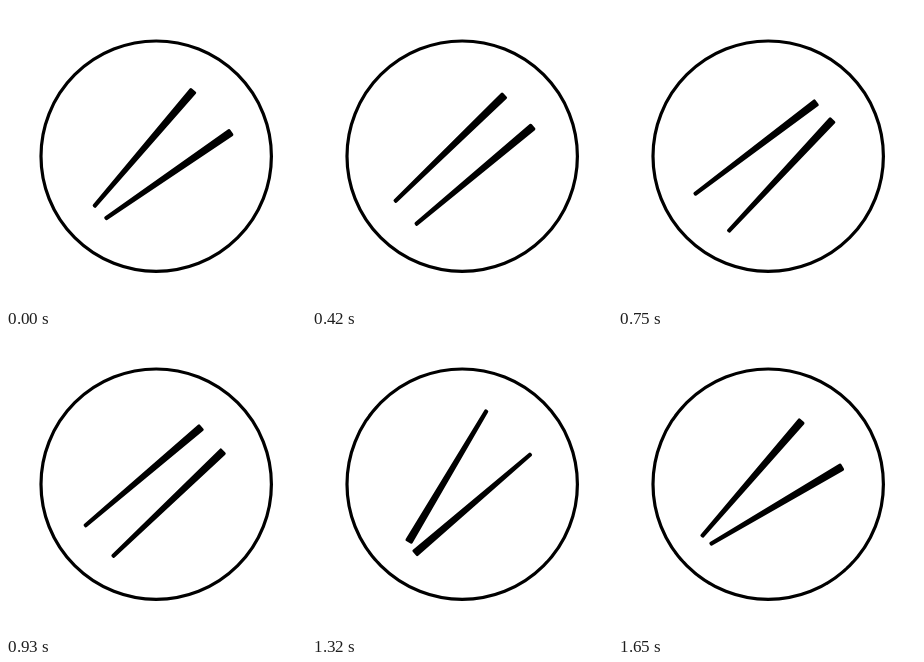
Recreate the animation shown at these times as an HTML page. Size 300 by 300 pixels, loop 1.68 s.

```html
<!DOCTYPE html>
<html lang="en">
<head>
<meta charset="utf-8">
<title>Chopsticks</title>
<style>
  html, body { margin: 0; width: 100%; height: 100%; overflow: hidden; background: #fff; }
  svg { display: block; width: 100%; height: 100%; }
</style>
</head>
<body>
<svg viewBox="0 0 300 300">
  <defs>
    <path id="stick" d="M-77 -.6L74 -2.5V2.5L-77 .6Z" stroke="#000" stroke-width="3" stroke-linejoin="round"/>
  </defs>
  <circle cx="150.2" cy="150.2" r="115.2" fill="none" stroke="#000" stroke-width="3.2"/>
  <use id="upper" href="#stick"/>
  <use id="lower" href="#stick"/>
</svg>
<script>
const LOOP = 1680, STEP = 30;
const MEAN_ANGLE = 42;
const SPIN = { start: 1080, end: 1500, degrees: 362.2 };
// Angle between the sticks: open, closed, open, closed, open.
const OPENING = [[0, 14.9], [270, -15], [545, 18.7], [820, -15], [1095, 18.7]];

const upper = document.getElementById('upper');
const lower = document.getElementById('lower');

const progress = (t, start, end) => Math.min(1, Math.max(0, (t - start) / (end - start)));
const easeSine = x => (1 - Math.cos(Math.PI * x)) / 2;

function openingAt(t) {
  let value = OPENING[0][1];
  for (let i = 1; i < OPENING.length; i++) {
    const [start, from] = OPENING[i - 1], [end, to] = OPENING[i];
    value += (to - from) * easeSine(progress(t, start, end));
  }
  return value;
}

function place(stick, x, y, angle) {
  stick.setAttribute('transform', `translate(${x} ${y}) rotate(${-angle})`);
}

function draw(t) {
  const spin = SPIN.degrees * progress(t, SPIN.start, SPIN.end) ** 1.33;
  const drift = easeSine(progress(t, 780, 1420));
  const dx = -4 * drift, dy = 2.1 * drift;
  const angle = MEAN_ANGLE - spin, half = openingAt(t) / 2;
  place(upper, 138.7 + dx, 141.4 + dy, angle + half);
  place(lower, 163.5 + dx, 168.6 + dy, angle - half);
}

const begin = performance.now();
function tick() {
  const t = (performance.now() - begin) % LOOP;
  draw(Math.floor(t / STEP) * STEP);
  requestAnimationFrame(tick);
}
tick();
</script>
</body>
</html>
```
